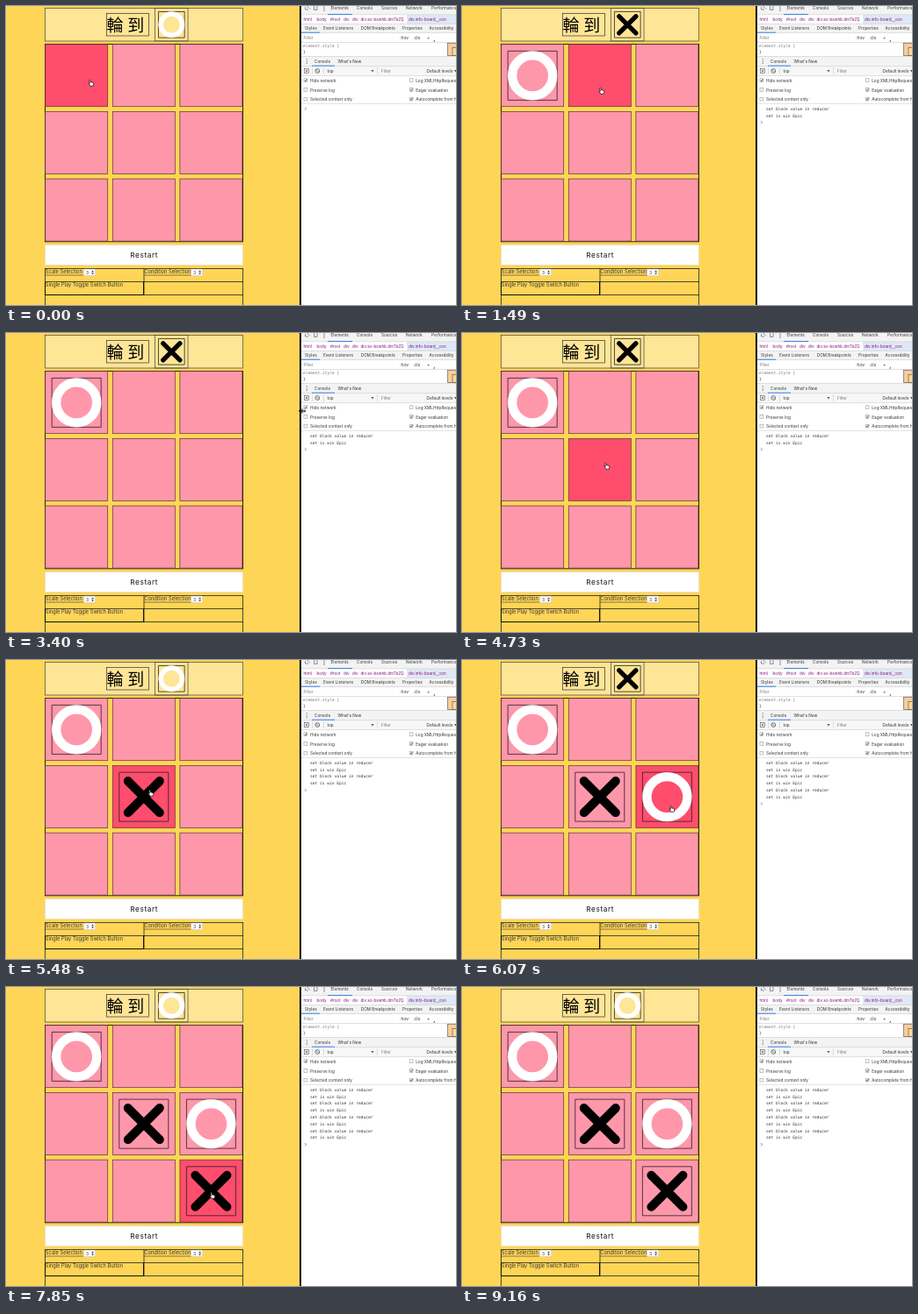
An HTML page for the animation above (9.35 s loop, 512 by 341 pixels).

```html
<!DOCTYPE html>
<html lang="en">
<head>
<meta charset="utf-8">
<style>
  html, body { margin: 0; height: 100%; overflow: hidden; background: #ffd557; }
  svg { display: block; width: 100vw; height: 100vh; }
  text { font-family: Inter, "Liberation Sans", sans-serif; fill: #333; white-space: pre; }
  .mono { font-family: "DejaVu Sans Mono", monospace; }
</style>
</head>
<body>
<svg id="stage" viewBox="0 0 512 341" preserveAspectRatio="none">
  <defs>
    <g id="frame"><rect x="-28" y="-28" width="56" height="56" fill="none" stroke="#222" stroke-width=".8" vector-effect="non-scaling-stroke"/></g>
    <g id="O"><use href="#frame"/><circle r="23" fill="none" stroke="#fff" stroke-width="10.4"/></g>
    <g id="X"><use href="#frame"/><path d="M-18-18 18 18M18-18-18 18" stroke="#000" stroke-width="10" stroke-linecap="round"/></g>
    <path id="hand" d="M-2.2-3.4q.9-.8 1.4.2l.4 2 2.4.6q1 .3.8 1.4L2.2 3.2H-1.2L-3 .6q-.2-.9.8-.6l.6.5Z" fill="#fff" stroke="#000" stroke-width=".7"/>
    <path id="arrow" d="M0 0V7.2L1.7 5.7 2.8 8.2 4 7.7 2.9 5.3H5.2Z" fill="#000" stroke="#fff" stroke-width=".6"/>
    <path id="resize" d="M-3.5 0H3.5M-2-1.6-3.6 0-2 1.6M2-1.6 3.6 0 2 1.6M0-2.6V2.6" fill="none" stroke="#000" stroke-width=".9"/>
  </defs>
  <g id="page"></g>
  <g id="tools"></g>
  <g id="live"></g>
</svg>
<script>
const LOOP = 9350, START = 750, STEP = 147.75;
const $ = id => document.getElementById(id);

const rect = (x, y, w, h, fill = 'none', stroke = 'none', sw = .8) =>
  `<rect x="${x}" y="${y}" width="${w}" height="${h}" fill="${fill}" stroke="${stroke}" stroke-width="${sw}"/>`;
const path = (d, stroke = '#222', sw = .8, fill = 'none') =>
  `<path d="${d}" stroke="${stroke}" stroke-width="${sw}" fill="${fill}"/>`;
const text = (x, y, s, size = 4.7, extra = '') =>
  `<text x="${x}" y="${y}" font-size="${size}" ${extra}>${s}</text>`;
const use = (id, x, y, scale = 1) => `<use href="#${id}" transform="translate(${x} ${y}) scale(${scale})"/>`;

const cellX = i => 44.7 + (i % 3) * 76.6;
const cellY = i => 43.7 + Math.floor(i / 3) * 76.7;
const CELL = 71;

function drawPage() {
  const select = x => rect(x, 300, 13.4, 7.6, '#fff', '#aaa', .4) + text(x + 2.6, 305.8, '3', 5) +
    path(`M${x + 8.8} 303.2l1.4-1.7 1.4 1.7zM${x + 8.8} 304.6l1.4 1.7 1.4-1.7z`, 'none', 0, '#222');
  return rect(44.5, 2.5, 225, 37.5, '#ffe596', '#444', .7) +
    rect(114.5, 8.5, 48, 25.5, 'none', '#333', .7) +
    text(114.6, 28.6, '輪到', 19, 'style="font-family:\'Noto Sans CJK TC\',\'Noto Sans CJK\',\'Noto Sans CJK JP\',sans-serif;fill:#000" font-weight="500" letter-spacing="4.6"') +
    rect(169.5, 2.5, 37.5, 37.5, 'none', '#444', .7) +
    rect(44.5, 43.5, 225, 225.3, 'none', '#111', .9) +
    rect(44.5, 272.7, 225, 22.6, '#fff', '#ddd', .5) +
    text(157.2, 287.4, 'Restart', 8.2, 'text-anchor="middle" letter-spacing=".6" style="fill:#111"') +
    path('M44.5 299V341M269.5 299V341') +
    rect(44.5, 299.5, 112, 15) + path('M44 299.5H270M44 314.5H270M157 299V329.5H44M157 329.5H270') +
    path('M44.5 315V329.5H156.5V314.5', '#111', 1) +
    text(44.8, 305.4, 'Scale Selection', 5.8) + text(157.2, 305.4, 'Condition Selection', 5.8) +
    path('M44.5 307H88M157 307H211', '#333', .6) +
    select(88.4) + select(210.4) +
    text(44.8, 320.4, 'Single Play Toggle Switch Button', 5.7);
}

function drawTools() {
  const row = (y, items, size = 4.7, extra = '') => items.map(([x, s]) => text(x, y, s, size, extra)).join('');
  const line = y => path(`M336 ${y}H512`, '#ccc', .6);
  const check = (x, y, label, on) => rect(x, y - 4, 3.8, 3.8, '#fff', '#888', .5) +
    (on ? path(`M${x + .8} ${y - 2.1}l1 1.1 1.5-2.3`, '#222', .8) : '') + text(x + 7, y, label);
  return rect(334, 0, 178, 341, '#fff') + rect(336, 0, 176, 30.5, '#f3f3f3') +
    rect(336, 10, 176, 10.3, '#fff') + rect(456, 10, 56, 10.3, '#dfe8f6') +
    rect(336, 57.5, 176, 11, '#f3f3f3') + rect(336, 68.5, 176, 11, '#f7f7f7') +
    [9.8, 20.4, 30.6, 41.5, 57.5, 68.6, 79.6, 111.3].map(line).join('') +
    rect(334, 0, 1.9, 341, '#000') +
    path('M340.5 1V4H344M342.5 0l3.5 3.5M350.5-1V4.5H354V-1M362-1V6', '#666', .7) +
    row(4, [[369.5, 'Elements'], [399, 'Console'], [427, 'Sources'], [455, 'Network'], [484, 'Performance']]) +
    path('M366 9.5H394M336 30.2H357M348 68.2H374', '#3b82e8', 1) +
    row(16.8, [[338.5, 'html'], [353.5, 'body'], [369, '#root'], [384, 'div'], [394, 'div'], [403.5, 'div.so-bxwhb.dmTkZQ'], [458, 'div.info-board__con']], 4.6, 'style="fill:#881280"') +
    row(27, [[340, 'Styles'], [361, 'Event Listeners'], [403.8, 'DOM Breakpoints'], [451, 'Properties'], [481.5, 'Accessibility']]) +
    text(338.5, 38, 'Filter', 4.7, 'style="fill:#777"') +
    row(38, [[448, ':hov'], [463, '.cls'], [479, '+']], 5) + path('M486 40.4h2v-2z', 'none', 0, '#555') +
    text(338, 46.6, 'element.style {', 4.57, 'class="mono" style="fill:#777"') +
    text(338, 53.6, '}', 4.57, 'class="mono"') +
    rect(502.5, 42.2, 10, 14.5, '#f9cc9d', '#333', .5) + rect(508, 47.5, 5, 9, '#fddc9a', '#333', .5) +
    [60.8, 63, 65.2].map(y => `<circle cx="342.3" cy="${y}" r=".6" fill="#555"/>`).join('') +
    row(64.7, [[351, 'Console'], [377.5, 'What\'s New']]) +
    rect(339.5, 71.5, 5, 5, 'none', '#555', .6) + path('M341.3 72.6v2.8l2.2-1.4z', 'none', 0, '#555') +
    '<circle cx="354.3" cy="74" r="2.4" fill="none" stroke="#555" stroke-width=".8"/>' +
    path('M352.7 72.4l3.2 3.2', '#555') + path('M348.5 70V78M361.5 70V78M422.5 70V78', '#ccc', .6) +
    text(365.5, 75.8, 'top') + path('M415.5 73h3l-1.5 2.4zM510 73h3l-1.5 2.4z', 'none', 0, '#555') +
    text(427, 75.8, 'Filter', 4.7, 'style="fill:#777"') + text(478.5, 75.8, 'Default levels') +
    check(339, 86.8, 'Hide network', 1) + check(339, 97.6, 'Preserve log') + check(339, 108.2, 'Selected context only') +
    check(459.2, 86.8, 'Log XMLHttpRequests') + check(459.2, 97.6, 'Eager evaluation', 1) +
    check(459.2, 108.2, 'Autocomplete from history', 1);
}

// Moves as [tick, cell]; players alternate, O first.
const MOVES = [[0, 0], [29, 4], [36, 5], [45, 8]];
// Pointer stops as [tick, x, y].
const STOPS = [
  [-9, 97, 88], [3, 97, 88], [5, 159, 97], [8, 159, 97], [11, 285, 115], [14, 405, 146], [15, 436, 144],
  [18, 337, 89], [19, 337, 89], [21, 385, 120], [23, 436, 140], [27, 165, 152], [32, 165, 152],
  [35, 239, 170], [42, 239, 170], [45, 235, 238], [48, 235, 238], [50, 300, 308], [54, 365, 24], [56, 372, 16]
];

function pointerAt(tick) {
  const next = STOPS.findIndex(s => s[0] >= tick);
  if (next < 0) return null;
  if (!next) return STOPS[0].slice(1);
  const [t0, x0, y0] = STOPS[next - 1], [t1, x1, y1] = STOPS[next];
  const k = (tick - t0) / (t1 - t0);
  return [x0 + (x1 - x0) * k, y0 + (y1 - y0) * k];
}

function drawLive(tick) {
  const played = MOVES.filter(m => m[0] <= tick);
  const pointer = pointerAt(tick);
  let out = '', hovering = false;

  for (let i = 0; i < 9; i++) {
    const x = cellX(i), y = cellY(i);
    const hover = pointer && pointer[0] > x && pointer[0] < x + CELL && pointer[1] > y && pointer[1] < y + CELL;
    hovering ||= hover;
    out += rect(x, y, CELL, CELL, hover ? '#ff4d6d' : '#ff97ab', '#5a3038', .7);
    const turn = played.findIndex(m => m[1] === i);
    if (turn >= 0) out += use('OX'[turn % 2], x + 35.5, y + 35.7);
  }
  out += use('OX'[played.length % 2], 188.3, 21.3, .53);

  const lines = played.flatMap(() => ['set block value in reducer', 'set is win Epic']);
  lines.forEach((s, i) => out += text(346, 118.7 + i * 7.8, s, 4.57, 'class="mono"'));
  const py = 117 + lines.length * 7.8;
  out += path(`M340 ${py - 1.4}l1.5 1.5-1.5 1.5`, '#3b78e7', .8);

  if (pointer) {
    const [x, y] = pointer;
    out += use(hovering ? 'hand' : Math.abs(x - 336) < 3 ? 'resize' : 'arrow', x, y);
  }
  return out;
}

$('page').innerHTML = drawPage();
$('tools').innerHTML = drawTools();

let shown = null;
function render(now) {
  const tick = Math.max(-1, Math.floor((now % LOOP - START + 15) / STEP));
  if (tick !== shown) $('live').innerHTML = drawLive(shown = tick);
  requestAnimationFrame(render);
}
render(performance.now());
</script>
</body>
</html>
```
